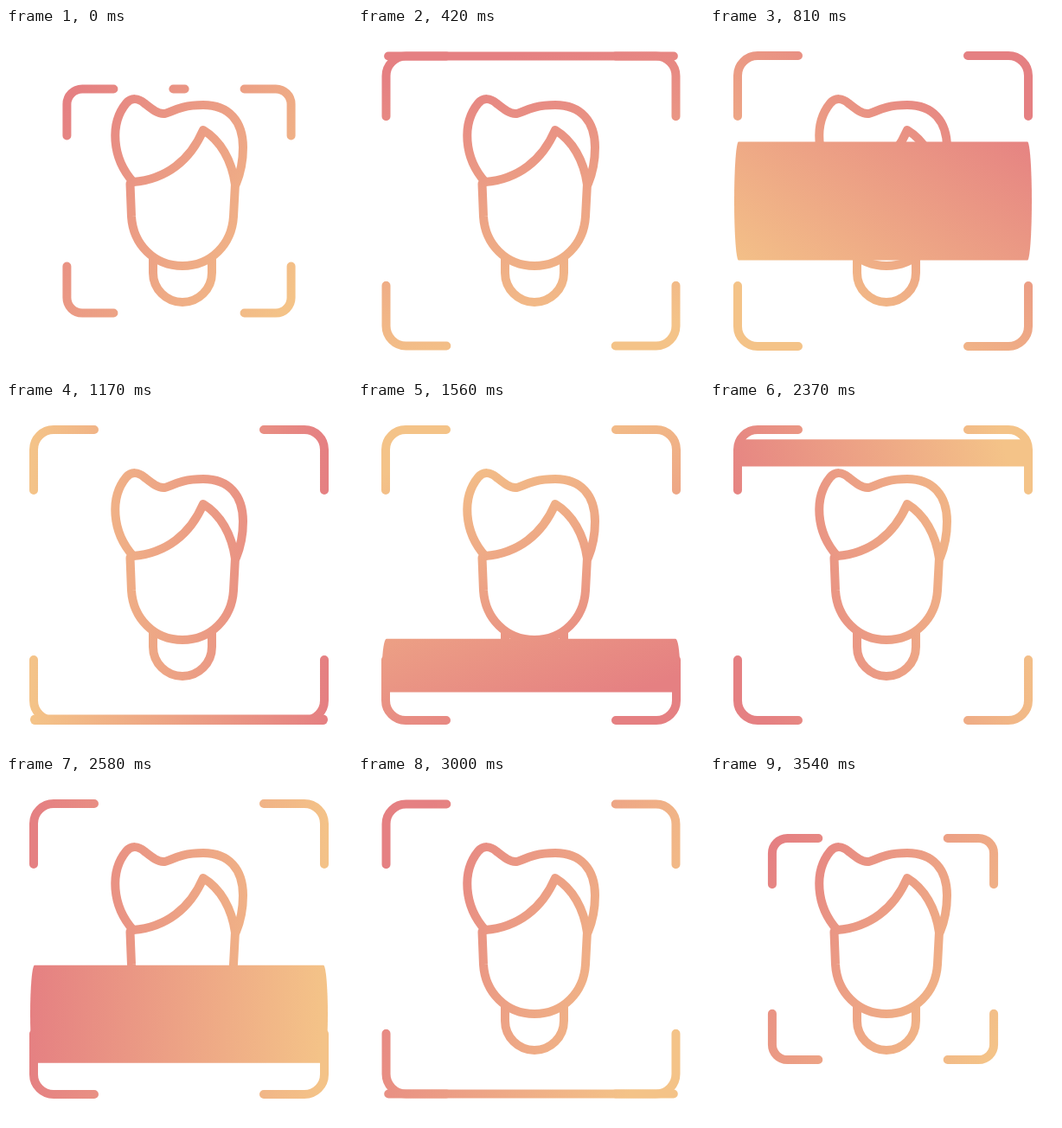
An HTML page that plays this animation: 400x400 px, repeating every 3.66 s.

```html
<!DOCTYPE html>
<html lang="en">
<head>
<meta charset="utf-8">
<title>Face scan</title>
<style>
html, body { margin: 0; width: 100%; height: 100%; overflow: hidden; background: #fff; }
svg { display: block; width: 100vw; height: 100vh; }
</style>
</head>
<body>
<svg viewBox="0 0 400 400">
  <defs>
    <linearGradient id="tone" gradientUnits="userSpaceOnUse">
      <stop offset="0" stop-color="#e58082"/>
      <stop offset="1" stop-color="#f4c388"/>
    </linearGradient>
  </defs>
  <g fill="none" stroke="url(#tone)" stroke-width="10" stroke-linecap="round" stroke-linejoin="round">
    <path d="M147 178C122 150 120 110 139 87C145 80 153 81 160 87C169 94 175 99 182 99C190 99 198 89 228 89C258 89 274 108 274 138C274 156 271 168 266 180"/>
    <path d="M147 178C185 175 213 153 228 118C248 130 261 153 265 181"/>
    <path d="M143.5 180L145 218C147 250 171 275 204 275C237 275 261 250 263 218L265 180"/>
    <path stroke-linecap="butt" d="M170 266V283A34 34 0 0 0 238 283V266"/>
    <path id="corners"/>
  </g>
  <rect id="bar" fill="url(#tone)"/>
</svg>
<script>
const LOOP = 3660, LAST = 3540, STEP = 30;
const PASS = 850;                  // length of one sweep
const MIDS = [810, 1648, 2516];    // middle of each sweep: down, up, down
const OPEN = 183, CLOSE = 3235;    // middle of the opening and closing moves
const SPIN = [[0, 212], [810, 305], [1170, 360], [1770, 462], [2370, 527], [3000, 563], [3540, 572]];

const tone = document.getElementById('tone');
const corners = document.getElementById('corners');
const bar = document.getElementById('bar');

function set(el, attrs) {
  for (const k in attrs) el.setAttribute(k, attrs[k]);
}

function ease(x) {
  x = Math.min(1, Math.max(0, x));
  return x < 0.5 ? 0.5 * (2 * x) ** 4.5 : 1 - 0.5 * (2 - 2 * x) ** 4.5;
}

const phase = (t, mid) => (t - mid) / PASS + 0.5;

function slope(i) {
  const a = SPIN[Math.max(0, i - 1)], b = SPIN[Math.min(SPIN.length - 1, i + 1)];
  return (b[1] - a[1]) / (b[0] - a[0]);
}

// Smooth curve through the SPIN points
function angle(t) {
  let i = 0;
  while (i < SPIN.length - 2 && t > SPIN[i + 1][0]) i++;
  const [t0, a] = SPIN[i], [t1, b] = SPIN[i + 1];
  const d = t1 - t0, u = (t - t0) / d, v = 1 - u;
  return v * v * (1 + 2 * u) * a + u * u * (3 - 2 * u) * b
    + d * u * v * (v * slope(i) - u * slope(i + 1));
}

function cornerPath(c) {
  const k = c / 168, arm = 70 * k, r = 23 * k;
  let d = '';
  for (const sx of [-1, 1]) for (const sy of [-1, 1]) {
    const x = 200 + sx * c, y = 200 + sy * c;
    d += `M${x - sx * arm} ${y}L${x - sx * r} ${y}`
      + `A${r} ${r} 0 0 ${sx === sy ? 0 : 1} ${x} ${y - sy * r}L${x} ${y - sy * arm}`;
  }
  // the sweep flag is flipped for the two corners where the path turns clockwise
  return d;
}

// Both edges of the bar follow the same easing, one behind the other
function edges(t, c) {
  let i = 0;
  while (i < 2 && t > (MIDS[i] + MIDS[i + 1]) / 2) i++;
  const x = Math.min(1.05, Math.max(0, phase(t, MIDS[i])));
  const lag = Math.max(0, 0.1 + 0.23 * (x - 0.5));
  const ys = [x + lag / 2, x - lag / 2].map(p => {
    const e = ease(p);
    return 200 + c * (i === 1 ? 1 - 2 * e : 2 * e - 1);
  });
  return [Math.min(...ys) - 5, Math.max(...ys) + 5];
}

function draw(t) {
  const open = t < 1500 ? ease(phase(t, OPEN)) : 1 - ease(phase(t, CLOSE));
  const c = 128 + 40 * open;
  set(corners, { d: cornerPath(c) });

  const [top, bottom] = edges(t, c), half = 167 * open + 5, h = bottom - top;
  set(bar, {
    x: 200 - half, y: top, width: 2 * half, height: h, rx: 5, ry: h / 2,
    visibility: open < 0.01 ? 'hidden' : 'visible'
  });

  const a = angle(t) * Math.PI / 180;
  const dx = 170 * Math.cos(a), dy = 170 * Math.sin(a);
  set(tone, { x1: 200 + dx, y1: 200 + dy, x2: 200 - dx, y2: 200 - dy });
}

const start = performance.now();
function tick() {
  const t = (performance.now() - start) % LOOP;
  draw(Math.min(LAST, Math.floor(t / STEP) * STEP));
  requestAnimationFrame(tick);
}
tick();
</script>
</body>
</html>
```
